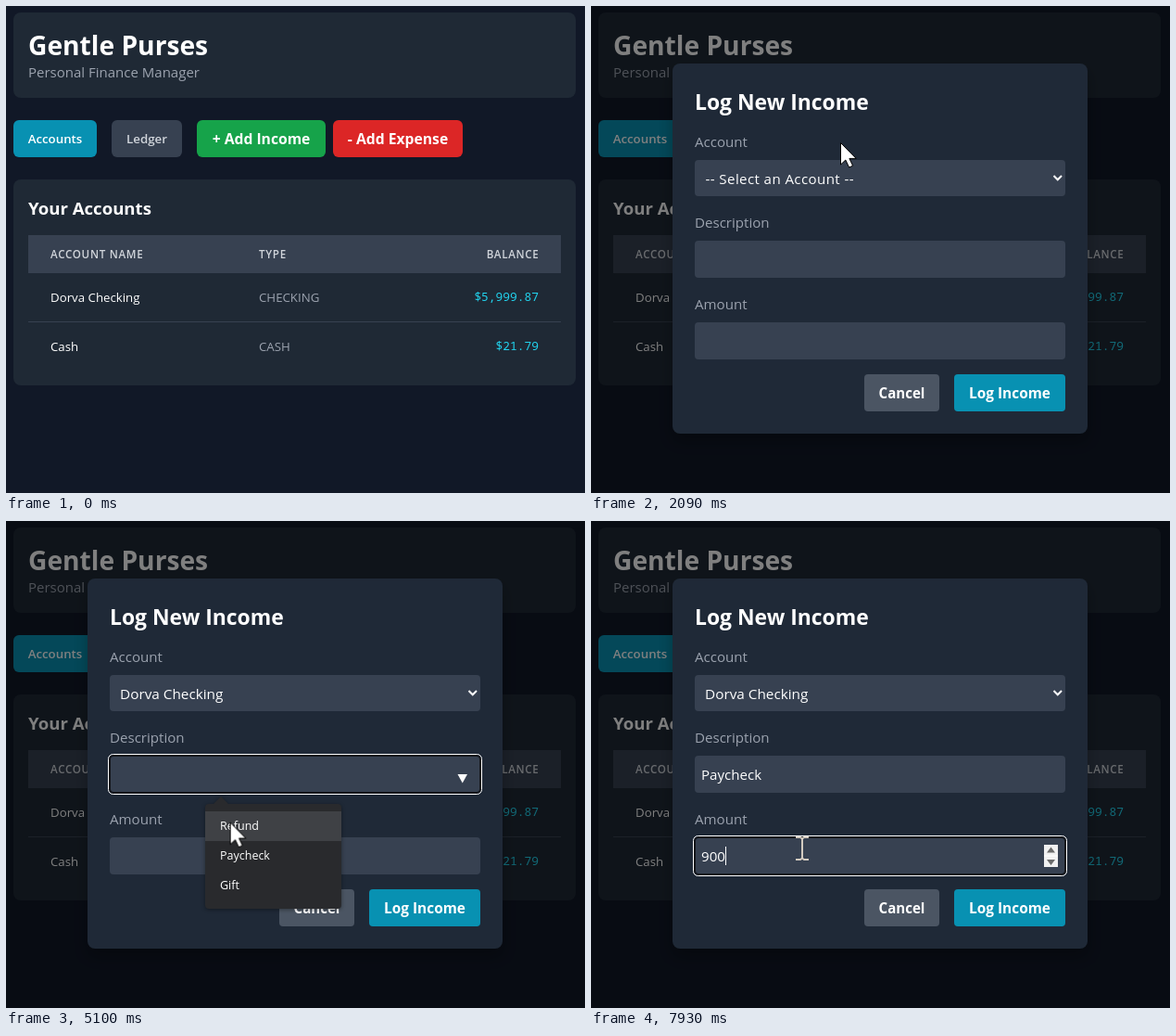
Recreate the animation shown at these times as an HTML page. Size 625 px wide and 525 px high, loop 8 s.

```html
<!DOCTYPE html>
<html lang="en">
<head>
<meta charset="utf-8">
<title>Personal Finance Manager</title>
<style>
html, body { margin: 0; width: 100%; height: 100%; overflow: hidden; background: #111827; }
body { position: relative; font: 15.1px "Open Sans", "Noto Sans", sans-serif; }
svg { position: absolute; left: 0; top: 0; display: block; }
text { fill: #fff; white-space: pre; }
.b { font-weight: 700; }
.sb { font-weight: 600; }
.mid { text-anchor: middle; }
.end { text-anchor: end; }
.muted { fill: #9ca3af; }
.soft { fill: #d1d5db; }
.th text { font-size: 11.6px; font-weight: 600; letter-spacing: .7px; fill: #d1d5db; }
.td text { font-size: 13.25px; }
.td .money { font: 500 12.9px "Noto Sans Mono", "DejaVu Sans Mono", monospace; fill: #22d3ee; }
.td .muted { fill: #9ca3af; }
.hint { letter-spacing: .4px; }
.pick { font-size: 15.3px; }
.panel { fill: #1f2935; }
.field { fill: #374151; }
.ring { fill: none; }
.ring .in { stroke: #101319; stroke-width: 2; }
.ring .out { stroke: #fff; }

.typed { position: absolute; left: 119px; height: 20px; line-height: 20px; color: #fff; white-space: nowrap; }
.typed i { font-style: normal; animation: key 8s step-end infinite; animation-delay: calc(var(--t) * 1ms - 8s); }
.typed b { display: inline-block; width: 1px; height: 20px; background: #fff; vertical-align: top; }

/* One 8 s clock: 1% is 80 ms */
.on { animation: 8s step-end infinite; }
.pointer { animation: path 8s linear infinite; }
.shown { animation-name: shown; }
.dialog { animation-name: dialog; }
.list { animation-name: list; }
.row { animation-name: row; }
.empty { animation-name: empty; }
.chosen { animation-name: chosen; }
.pickring { animation-name: pickring; }
.descring { animation-name: descring; }
.desc { animation-name: desc; }
.desc b { animation: desccaret 8s step-end infinite; }
.mark { animation-name: mark; }
.past { animation-name: past; }
.hover { animation-name: hover; }
.spin { animation-name: spin; }
.amt { animation-name: amt; }
.amt b { animation: amtcaret 8s step-end infinite; }
.arrow { animation-name: arrow; }
.beam { animation-name: beam; }

@keyframes key { 0% { font-size: 15.1px } 45%, 100% { font-size: 0 } }
@keyframes shown { 0% { opacity: 0 } 9.125%, 100% { opacity: 1 } }
@keyframes dialog { 0% { opacity: 0 } 25.25%, 100% { opacity: 1 } }
@keyframes list { 0% { opacity: 0 } 37.125% { opacity: 1 } 48.75%, 100% { opacity: 0 } }
@keyframes row { 0% { transform: none } 42.875%, 100% { transform: translateY(29px) } }
@keyframes empty { 0% { opacity: 1 } 48.75%, 100% { opacity: 0 } }
@keyframes chosen { 0% { opacity: 0 } 48.75%, 100% { opacity: 1 } }
@keyframes pickring { 0% { opacity: 0 } 48.75% { opacity: 1 } 55.375%, 100% { opacity: 0 } }
@keyframes descring { 0% { opacity: 0 } 55.375% { opacity: 1 } 80%, 100% { opacity: 0 } }
@keyframes desc { 0% { opacity: 0 } 55.375%, 100% { opacity: 1 } }
@keyframes desccaret { 0% { opacity: 1 } 62% { opacity: 0 } 68.625% { opacity: 1 } 79.125%, 100% { opacity: 0 } }
@keyframes mark { 0% { opacity: 0 } 52.875% { opacity: 1 } 80%, 100% { opacity: 0 } }
@keyframes past { 0% { opacity: 0 } 55.375% { opacity: 1 } 72.5%, 100% { opacity: 0 } }
@keyframes hover { 0% { opacity: 0; transform: none } 62.25% { opacity: 1; transform: none } 66.25%, 100% { opacity: 1; transform: translateY(32px) } }
@keyframes spin { 0% { opacity: 0 } 72.5%, 100% { opacity: 1 } }
@keyframes amt { 0% { opacity: 0 } 80%, 100% { opacity: 1 } }
@keyframes amtcaret { 0% { opacity: 1 } 86.625% { opacity: 0 } 93.25%, 100% { opacity: 1 } }
@keyframes arrow { 0% { opacity: 1 } 52% { opacity: 0 } 59.875% { opacity: 1 } 72.5%, 100% { opacity: 0 } }
@keyframes beam { 0% { opacity: 0 } 52% { opacity: 1 } 59.875% { opacity: 0 } 72.5%, 100% { opacity: 1 } }
@keyframes path {
  0%, 8.25% { transform: translate(560px, 540px) }
  14.125% { transform: translate(425px, 318px) }
  15% { transform: translate(398px, 270px) }
  17.75% { transform: translate(284.5px, 195px) }
  18.5% { transform: translate(278px, 187px) }
  21.875%, 30.375% { transform: translate(269px, 147px) }
  33.75%, 39.5% { transform: translate(269px, 183px) }
  42% { transform: translate(257px, 222px) }
  43.625% { transform: translate(249px, 250px) }
  44.5%, 46.25% { transform: translate(244px, 242px) }
  47%, 47.875% { transform: translate(226px, 233px) }
  53.625%, 57% { transform: translate(235px, 269.5px) }
  67.25% { transform: translate(245px, 353px) }
  69.875%, 71.625% { transform: translate(243px, 356px) }
  75%, 76.5% { transform: translate(239px, 358px) }
  82.5% { transform: translate(226px, 356px) }
  86.625%, 100% { transform: translate(228px, 353px) }
}
</style>
</head>
<body>
<svg width="625" height="525" viewBox="0 0 625 525">
  <defs>
    <g id="ring" class="ring">
      <rect class="in" x="112" y="1" width="400" height="40" rx="4"/>
      <rect class="out" x="110.5" y="-.5" width="403" height="43" rx="5"/>
    </g>
  </defs>

  <rect width="625" height="525" fill="#111827"/>
  <rect class="panel" x="8" y="7" width="607" height="92" rx="8"/>
  <text class="b" x="24" y="53" font-size="28.2">Gentle Purses</text>
  <text class="muted" x="24" y="77" font-size="15">Personal Finance Manager</text>

  <rect x="8" y="123" width="90" height="40" rx="6" fill="#0891b2"/>
  <text class="sb mid" x="53" y="148" font-size="13.3">Accounts</text>
  <rect class="field" x="114" y="123" width="76" height="40" rx="6"/>
  <text class="sb mid soft" x="152" y="148" font-size="13.3">Ledger</text>
  <rect x="206" y="123" width="139" height="40" rx="6" fill="#16a34a"/>
  <text class="b mid" x="275.5" y="149" font-size="15.7">+ Add Income</text>
  <rect x="353" y="123" width="140" height="40" rx="6" fill="#dc2626"/>
  <text class="b mid" x="423" y="149" font-size="15.7">- Add Expense</text>

  <rect class="panel" x="8" y="187" width="607" height="222" rx="8"/>
  <text class="b" x="24" y="225" font-size="18.6">Your Accounts</text>
  <rect class="field" x="24" y="247" width="575" height="41"/>
  <g class="th">
    <text x="48" y="272">ACCOUNT NAME</text>
    <text x="273" y="272">TYPE</text>
    <text class="end" x="575.5" y="272">BALANCE</text>
  </g>
  <rect class="field" x="24" y="340" width="575" height="1"/>
  <g class="td">
    <text x="48" y="319">Dorva Checking</text>
    <text class="muted" x="273" y="319">CHECKING</text>
    <text class="money end" x="575" y="318">$5,999.87</text>
    <text x="48" y="372">Cash</text>
    <text class="muted" x="273" y="372">CASH</text>
    <text class="money end" x="575" y="371">$21.79</text>
  </g>

  <g class="on dialog">
    <rect width="625" height="525" opacity=".5"/>
    <rect x="88" y="62" width="448" height="399" rx="8" fill="#1f2937" style="filter: drop-shadow(0 8px 8px #0004)"/>
    <text class="b" x="112" y="112" font-size="22.9">Log New Income</text>
    <text class="muted" x="112" y="152">Account</text>
    <text class="muted" x="112" y="239">Description</text>
    <text class="muted" x="112" y="327">Amount</text>
    <rect class="field" x="112" y="166" width="400" height="39" rx="4"/>
    <rect class="field" x="112" y="253" width="400" height="40" rx="4"/>
    <rect class="field" x="112" y="341" width="400" height="40" rx="4"/>
    <text class="on empty hint" x="123.5" y="192">-- Select an Account --</text>
    <text class="on chosen pick" x="123" y="192">Dorva Checking</text>
    <path d="M499.5 183l4.25 4.25 4.25-4.25" fill="none" stroke="#fff" stroke-width="2"/>
    <rect x="295" y="397" width="81" height="40" rx="4" fill="#4b5563"/>
    <text class="b mid" x="335.5" y="423">Cancel</text>
    <rect x="392" y="397" width="120" height="40" rx="4" fill="#0891b2"/>
    <text class="b mid" x="452" y="423" font-size="15.4">Log Income</text>
  </g>

  <g class="on pickring"><use href="#ring" y="164.5"/></g>
  <g class="on descring"><use href="#ring" y="252"/></g>
  <g class="on amt"><use href="#ring" y="340"/></g>
  <path class="on mark" d="M487.5 273h10.5l-5.25 9.5z" fill="#fff"/>
  <g class="on spin">
    <rect x="489" y="349" width="15" height="24" fill="#f1f1f1"/>
    <rect x="489" y="360.5" width="15" height="1" fill="#fff"/>
    <path d="M492 357.5h9l-4.5-6zM492 365h9l-4.5 6z" fill="#6b6b6b"/>
  </g>

  <g class="on list">
    <rect x="112.5" y="205.5" width="399" height="88" fill="#374151" stroke="#7b7f86"/>
    <rect class="on row" x="113" y="206" width="398" height="29" fill="#1967d2"/>
    <text class="hint" x="125.5" y="227">-- Select an Account --</text>
    <text class="pick" x="125" y="256">Dorva Checking</text>
    <text class="pick" x="125" y="285">Cash</text>
  </g>

  <!-- Suggestions bubble under the description -->
  <g class="on past" font-size="12.5">
    <path d="M219 305h5l8-8 8 8h118q4 0 4 4v105q0 4-4 4h-139q-4 0-4-4v-105q0-4 4-4z" fill="#292a2d" style="filter: drop-shadow(0 1px 2px #0006)"/>
    <rect class="on hover" x="215" y="313" width="147" height="32" fill="#3f4145"/>
    <text x="231" y="333">Refund</text>
    <text x="231" y="365">Paycheck</text>
    <text x="231" y="397">Gift</text>
  </g>
</svg>

<div class="typed on desc" style="top:263px"><i style="--t:5800">Paycheck</i><b></b></div>
<div class="typed on amt" style="top:351px"><i style="--t:7590">9</i><i style="--t:7730">0</i><i style="--t:7930">0</i><b></b></div>

<svg width="625" height="525" viewBox="0 0 625 525">
  <g class="on shown">
    <g class="pointer">
      <path class="on arrow" d="M.5.5v23.5l5.3-5 3.8 8 4-1.8-3.7-7.8h7.3z" fill="#fff" stroke="#000"/>
      <path class="on beam" d="M-7-12h5l2 1.5 2-1.5h5M-7 12h5l2-1.5 2 1.5h5M0-11v22" fill="none" stroke="#d3cbc0" stroke-width="2"/>
    </g>
  </g>
</svg>
</body>
</html>
```
